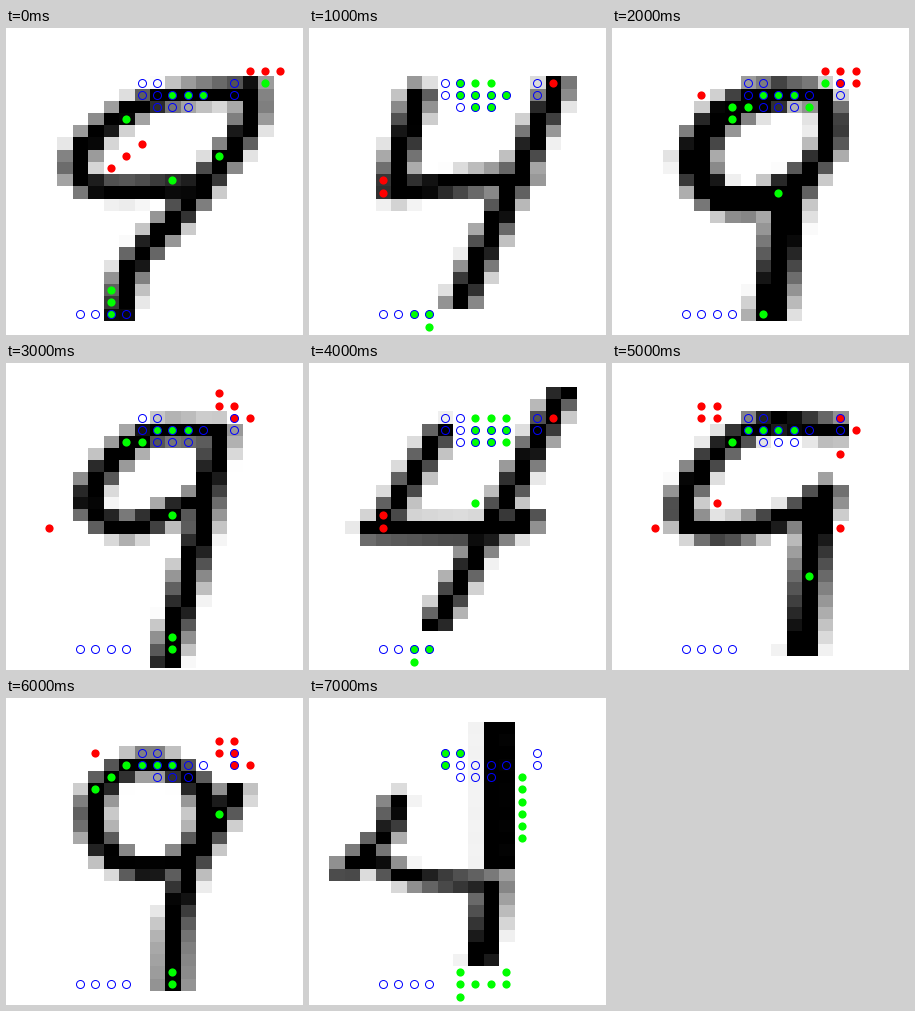
A matplotlib script for the animation above (8000 ms loop, 297 by 307 pixels).

```python
import numpy as np
import matplotlib.pyplot as plt
from matplotlib.animation import FuncAnimation

W, H, DPI = 297, 307, 100
COLS, ROWS = 18, 23
LEFT, TOP, CELL_W, CELL_H = 4.5, 24.4, 15.42, 12.19
SOFT = 0.95  # width of the grey edge of a stroke, in cells

gx, gy = np.meshgrid(np.arange(COLS), np.arange(ROWS))


def curve(*pts, steps=40):
    """Smooth Catmull-Rom path through a few key points."""
    p = np.array(pts, float)
    p = np.vstack([2 * p[0] - p[1], p, 2 * p[-1] - p[-2]])
    t = np.linspace(0, 1, steps)[:, None]
    spans = [b + t * (c - a) / 2
             + t**2 * (2 * a - 5 * b + 4 * c - d) / 2
             + t**3 * (3 * b - a - 3 * c + d) / 2
             for a, b, c, d in zip(p, p[1:], p[2:], p[3:])]
    return np.vstack(spans)


def ellipse(cx, cy, rx, ry):
    a = np.linspace(0, 2 * np.pi, 120)
    return np.column_stack([cx + rx * np.cos(a), cy + ry * np.sin(a)])


def stroke(path, radius=1.4):
    dist = np.hypot(gx[..., None] - path[:, 0], gy[..., None] - path[:, 1])
    return np.clip((radius - dist.min(axis=-1)) / SOFT, 0, 1)


def digit(first, last, *strokes):
    """Darkest of all strokes, kept between two rows."""
    inside = (gy >= first) & (gy <= last)
    return 1 - np.max(strokes, axis=0) * inside


def block(col, row, w=1, h=1):
    return [(col + i, row + j) for j in range(h) for i in range(w)]


def diagonal(col, row, n):
    return [(col - i, row + i) for i in range(n)]


def to_px(cells):
    c, r = np.array(cells, float).reshape(-1, 2).T
    return LEFT + (c + 0.5) * CELL_W, TOP + (r + 0.5) * CELL_H


RINGS = (block(8, 2, 2, 2) + block(10, 3, 3) + block(9, 4, 3)
         + block(14, 2, 1, 2) + block(4, 21, 4))
FOUR_RED = block(15, 2) + block(4, 10, 1, 2)

# Each scene: digit, green dots, red dots
SCENES = [
    (digit(2, 21,
           stroke(curve((15, 2.6), (9, 3.4), (5.4, 5.9), (3.8, 8.6),
                        (5.2, 10.6), (11.5, 10.5)), 1.35),
           stroke(curve((15.1, 2.5), (14.6, 6), (10.5, 12.6),
                        (7.4, 17), (6.5, 21)))),
     block(16, 2) + block(10, 3, 3) + block(7, 5) + block(13, 8)
     + block(10, 10) + block(6, 19, 1, 3),
     block(15, 1, 3) + diagonal(8, 7, 3)),

    (digit(2, 20,
           stroke(curve((6.2, 3), (4.6, 10.3))),
           stroke(curve((4.6, 10.8), (13, 9.8))),
           stroke(curve((15.2, 2.4), (9, 20)))),
     block(9, 2, 3) + block(9, 3, 4) + block(10, 4, 2)
     + block(6, 21, 2) + block(7, 22),
     FOUR_RED),

    (digit(2, 21,
           stroke(curve((10, 3), (6.7, 4.4), (4.6, 8), (6, 11.3),
                        (9, 11.6), (11.5, 10)), 1.7),
           stroke(curve((8.5, 2.9), (12.6, 3.2), (13.2, 7), (11, 10.3))),
           stroke(curve((10.6, 11), (10.1, 16), (9.4, 21)), 1.7)),
     block(13, 2) + block(9, 3, 3) + block(7, 4, 2) + block(12, 4)
     + block(7, 5) + block(10, 11) + block(9, 21),
     block(13, 1, 3) + block(14, 2, 2) + block(5, 3)),

    (digit(2, 22,
           stroke(curve((13, 3.2), (8, 3.6), (4.5, 8.5), (7, 10.9), (12, 8.6))),
           stroke(curve((13, 3.2), (11.8, 11), (9.6, 22)))),
     block(9, 3, 3) + block(7, 4, 2) + block(10, 10) + block(10, 20, 1, 2),
     block(13, 0) + block(13, 1, 2) + block(14, 2, 2) + block(2, 11)),

    (digit(0, 19,
           stroke(curve((7.7, 3.2), (3.7, 11.2)), 1.3),
           stroke(curve((3.3, 11.2), (11, 11.2), (13.3, 10.3))),
           stroke(curve((15.6, 0), (12.2, 8), (7.4, 19)), 1.35)),
     block(10, 2, 3, 3) + block(10, 9) + block(6, 21, 2) + block(6, 22),
     FOUR_RED),

    (digit(2, 21,
           stroke(curve((13.6, 2.9), (9, 2.6), (5.4, 5.6), (3.7, 9.7),
                        (6, 11.3), (10.5, 10.2), (12.8, 8.3))),
           stroke(curve((13, 8.2), (12.3, 12), (11.5, 21)), 1.55)),
     block(8, 3, 4) + block(7, 4) + block(12, 15),
     block(5, 1, 2, 2) + block(14, 2) + block(15, 3) + block(14, 5)
     + block(6, 9) + block(2, 11) + block(14, 11)),

    (digit(2, 21,
           stroke(ellipse(8.5, 7.2, 3.7, 4.3)),
           stroke(curve((13.9, 5.4), (11.2, 11))),
           stroke(curve((11, 11), (10.2, 16), (10, 21)))),
     block(7, 3, 4) + diagonal(6, 4, 2) + block(13, 7) + block(10, 20, 1, 2),
     block(13, 1, 2, 2) + block(5, 2) + block(14, 3, 2)),

    (digit(0, 19,
           stroke(curve((4.8, 6.1), (4.2, 8.5), (1.5, 11.7)), 1.25),
           stroke(curve((3, 10.8), (6, 12.2), (11, 12.7)), 1.2),
           stroke(curve((11.45, 0), (11.45, 11)), 1.5),
           stroke(curve((11, 13), (10.4, 19)), 1.45)),
     block(8, 2, 2) + block(8, 3) + block(13, 4, 1, 6)
     + block(9, 20) + block(12, 20) + block(9, 21, 4) + block(9, 22),
     []),
]

fig = plt.figure(figsize=(W / DPI, H / DPI), dpi=DPI, facecolor="white")
ax = fig.add_axes([0, 0, 1, 1])
ax.axis("off")

px = 72 / DPI
image = ax.imshow(SCENES[0][0], cmap="gray", vmin=0, vmax=1,
                  interpolation="nearest", aspect="auto",
                  extent=(LEFT, LEFT + COLS * CELL_W, TOP + ROWS * CELL_H, TOP))
green, = ax.plot([], [], "o", color="#00ff00", ms=8.2 * px, mew=0)
red, = ax.plot([], [], "o", color="#ff0000", ms=8.2 * px, mew=0)
ax.plot(*to_px(RINGS), "o", mfc="none", mec="#0000ff", ms=8 * px, mew=px)
ax.set_xlim(0, W)
ax.set_ylim(H, 0)


def draw(i):
    shade, plus, minus = SCENES[i]
    image.set_data(shade)
    green.set_data(*to_px(plus))
    red.set_data(*to_px(minus))
    return image, green, red


anim = FuncAnimation(fig, draw, frames=len(SCENES), interval=1000, repeat=True)
plt.show()
```
